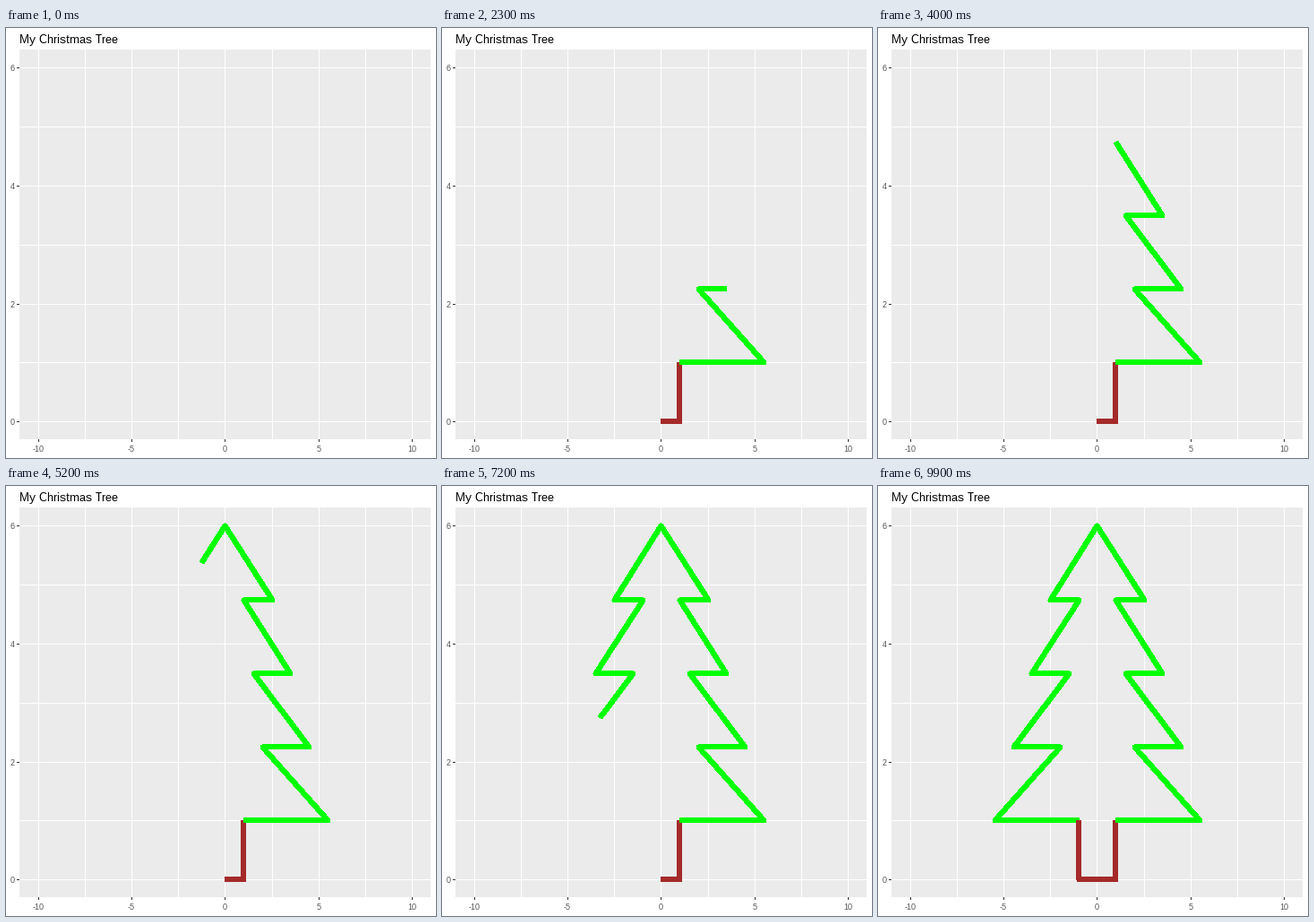
Animation, 480 px wide and 480 px high, one loop 10 s. Source, as a matplotlib script:

```python
import matplotlib.pyplot as plt
import numpy as np
from matplotlib.animation import FuncAnimation
from matplotlib.patches import Rectangle

SIZE, FRAMES, INTERVAL = 480, 100, 100
GREEN, BROWN = "#00FF00", "#A52A2A"

plt.rcParams.update({
    "font.family": "Liberation Sans",
    "text.hinting": "default",
    "text.hinting_factor": 1,
})

# Right half of the tree from the foot to the top; the left half mirrors it.
half = [(0, 0), (1, 0), (1, 1), (5.5, 1), (2, 2.25), (4.5, 2.25),
        (1.5, 3.5), (3.5, 3.5), (1, 4.75), (2.5, 4.75), (0, 6)]
points = np.array(half + [(-x, y) for x, y in half[-2::-1]], float)
last = len(points) - 1
# Each corner is reached on a whole frame.
times = np.round(np.arange(last + 1) * (FRAMES - 1) / last)


def px(x):
    return np.floor(244.45 + 20.87 * np.asarray(x) + 0.5)


def py(y):
    return np.floor(439.3 - 65.83 * np.asarray(y) + 0.5)


fig = plt.figure(figsize=(SIZE / 72, SIZE / 72), dpi=72, facecolor="white")
ax = fig.add_axes([0, 0, 1, 1])
ax.set(xlim=(0, SIZE), ylim=(SIZE, 0))
ax.axis("off")


def box(x, y, w, h, color):
    ax.add_patch(Rectangle((x, y), w, h, fc=color, lw=0, antialiased=False))


def label(x, y, text, ha, size=9, color="#4D4D4D"):
    ax.text(x, y, text, ha=ha, va="baseline", fontsize=size, color=color)


LEFT, TOP, RIGHT, BOTTOM = 15, 24, 474, 459
box(LEFT, TOP, RIGHT - LEFT, BOTTOM - TOP, "#EBEBEB")
for x in np.arange(-10, 10.1, 2.5):
    box(px(x), TOP, 1, BOTTOM - TOP, "white")
for y in range(7):
    box(LEFT, py(y), RIGHT - LEFT, 1, "white")
for x in range(-10, 11, 5):
    box(px(x), BOTTOM, 1, 3, "#333333")
    label(px(x), 473, str(x), "center")
for y in range(0, 7, 2):
    box(LEFT - 3, py(y), 3, 1, "#333333")
    label(10, py(y) + 4, str(y), "right")
label(LEFT, 17, "My Christmas Tree", "left", 13, "black")


def stroke(first, end, color):
    line, = ax.plot([], [], color=color, lw=5, antialiased=False, snap=False,
                    solid_capstyle="butt", solid_joinstyle="round")
    return line, first, end


strokes = [stroke(0, 2, BROWN), stroke(2, last - 2, GREEN),
           stroke(last - 2, last, BROWN)]


def draw(frame):
    tip = [np.interp(frame, times, points[:, i]) for i in (0, 1)]
    for line, first, end in strokes:
        part = [points[i] for i in range(first, end + 1) if times[i] <= frame]
        if part and frame < times[end]:
            if frame > times[first + len(part) - 1]:
                part.append(tip)
        if len(part) < 2:
            line.set_data([], [])
            continue
        x, y = np.array(part).T
        line.set_data(px(x) + 0.49, py(y) + 0.49)
    return [line for line, _, _ in strokes]


anim = FuncAnimation(fig, draw, frames=FRAMES, interval=INTERVAL,
                     repeat=True, repeat_delay=0)
plt.show()
```
